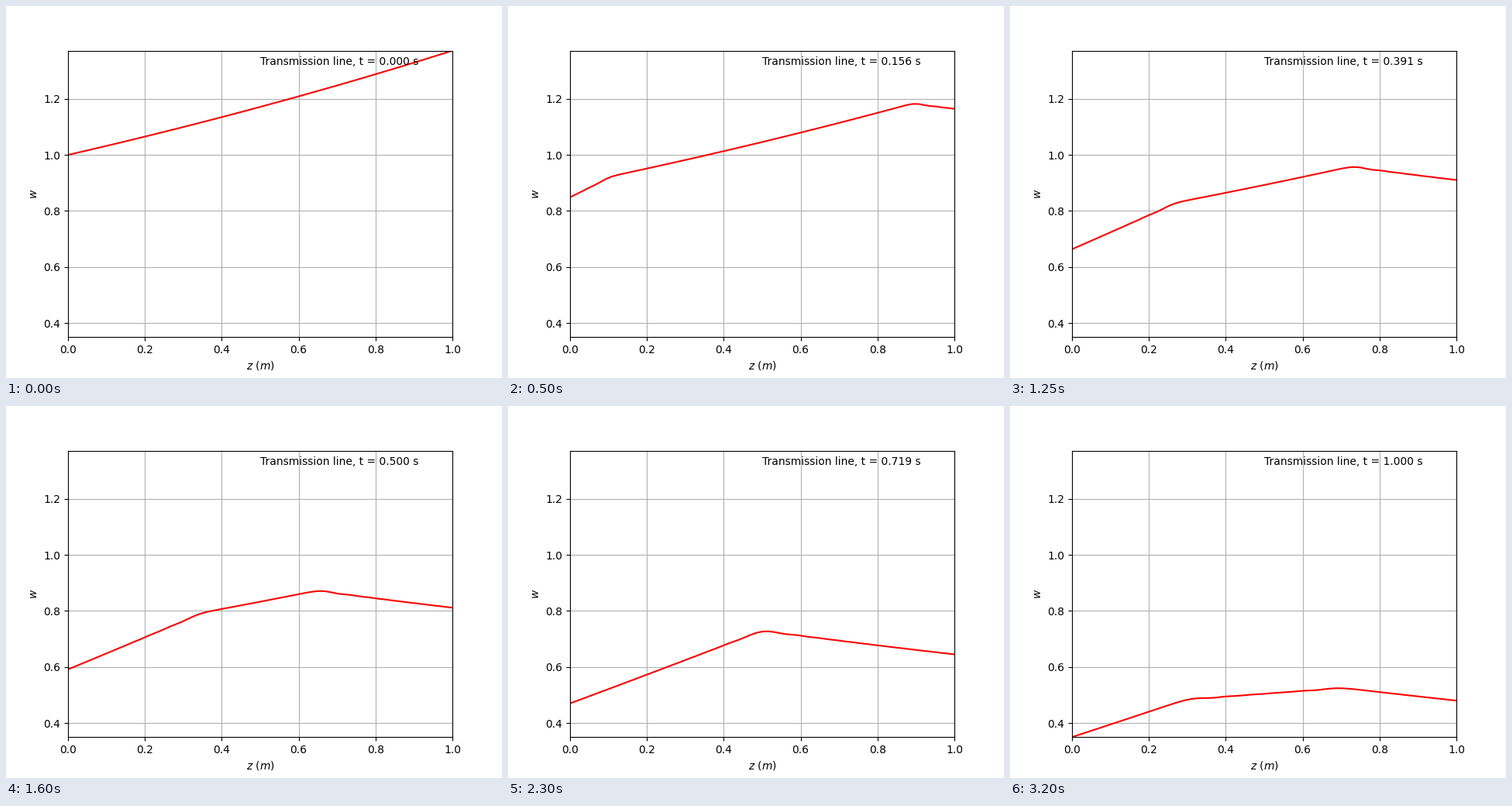
These frames come from a looping animation (640 by 480 pixels, 3250 ms). A matplotlib script:

```python
import numpy as np
import matplotlib.pyplot as plt
from matplotlib.animation import FuncAnimation

# Telegrapher's equation: w_tt + p w_t + q w = c2 w_zz
R, L, G, C = 1.0, 1.0, 0.1, 2.0
p = R / L + G / C
q = R * G / (L * C)
c2 = 1 / (L * C)
a = np.sqrt(R * G)

M = N = 64
dz, dt = 1 / M, 1 / N
z = np.linspace(0, 1, M + 1)
t = np.linspace(0, 1, N + 1)


def curvature(u):
    return (u[2:] - 2 * u[1:-1] + u[:-2]) / dz**2


def solve():
    """Explicit central differences with decaying end values."""
    w = np.zeros((N + 1, M + 1))
    w[0] = np.exp(a * z)
    w[:, 0] = np.exp(-p * t)
    w[:, -1] = np.exp(a - p * t)
    v = -p * np.sqrt(c2) * w[0, 1:-1]
    acc = c2 * curvature(w[0]) - q * w[0, 1:-1] - p * v
    w[1, 1:-1] = w[0, 1:-1] + dt * v + dt**2 / 2 * acc
    h = p * dt / 2
    for n in range(1, N):
        force = c2 * curvature(w[n]) - q * w[n, 1:-1]
        w[n + 1, 1:-1] = (2 * w[n, 1:-1] - (1 - h) * w[n - 1, 1:-1]
                          + dt**2 * force) / (1 + h)
    return w


w = solve()

fig, ax = plt.subplots(figsize=(6.4, 4.8), dpi=100)
ax.set_xlim(0, 1)
ax.set_ylim(w.min(), w.max())
ax.set_xlabel(r"$z$ $(m)$")
ax.set_ylabel(r"$w$")
ax.grid(True)
line, = ax.plot(z, w[0], "r")
label = ax.text(0.5, 0.95, "", transform=ax.transAxes)


def update(n):
    line.set_ydata(w[n])
    label.set_text(f"Transmission line, t = {t[n]:.3f} s")
    return line, label


anim = FuncAnimation(fig, update, frames=N + 1, interval=50,
                     repeat=True, repeat_delay=0)
plt.show()
```
